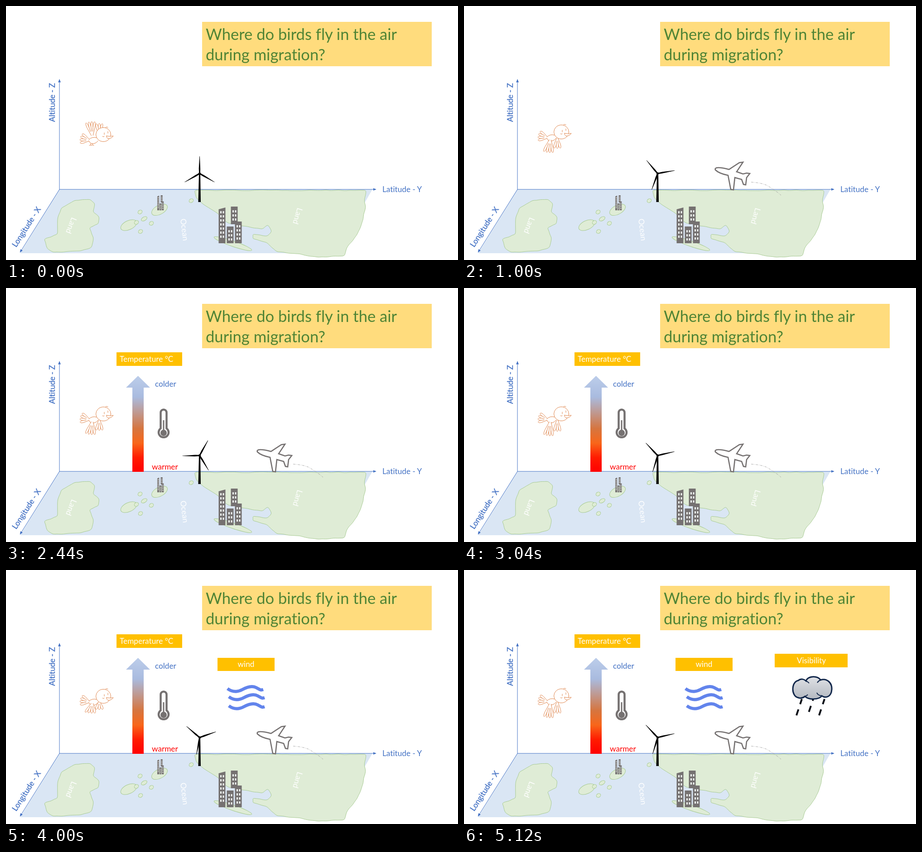
An HTML page for the animation above (5.16 s loop, 998 by 561 pixels).

```html
<!DOCTYPE html>
<html lang="en">
<head>
<meta charset="utf-8">
<title>Bird migration in three dimensions</title>
<style>
html, body { margin: 0; width: 100%; height: 100%; overflow: hidden; background: #fff; }
svg { display: block; width: 100%; height: 100%; }
text { font: 17.2px Lato, Carlito, sans-serif; font-variant-ligatures: none; fill: #4472c4; }
.title { font-size: 34.6px; fill: #4f8435; }
.label, .map { fill: #fff; }
.map, .mid { text-anchor: middle; }
.turned { stroke: #4472c4; stroke-width: .3; }
.axis { fill: none; stroke: #4472c4; marker-end: url(#tip); }
#land > * { fill: #dfecd6; stroke: #a8cb93; }
.pen { fill: #fff; stroke: #e0874f; stroke-linejoin: round; stroke-linecap: round; }
.line { fill: none; }
</style>
</head>
<body>
<svg viewBox="0 0 998 561">
  <defs>
    <linearGradient id="heat" x1="0" y1="0" x2="0" y2="1">
      <stop offset="0" stop-color="#bccdea"/>
      <stop offset=".22" stop-color="#a9bbdf"/>
      <stop offset=".55" stop-color="#d6753f"/>
      <stop offset=".7" stop-color="#f8661a"/>
      <stop offset=".85" stop-color="#ff1c00"/>
      <stop offset="1" stop-color="#f00"/>
    </linearGradient>
    <linearGradient id="grey" x1="0" y1="0" x2="0" y2="1">
      <stop offset="0" stop-color="#dfe1e5"/>
      <stop offset="1" stop-color="#b4b9c1"/>
    </linearGradient>
    <marker id="tip" viewBox="0 0 7 6" markerWidth="7" markerHeight="6" refX="6.5" refY="3" orient="auto">
      <path d="M0,0L7,3L0,6Z" fill="#4472c4"/>
    </marker>
    <g id="city"></g>
  </defs>

  <rect x="433" y="35" width="507" height="98" fill="#ffdc7d"/>
  <text class="title" x="441" y="75">Where do birds fly in the air</text>
  <text class="title" x="441" y="120">during migration?</text>

  <path d="M118,405H809L728,546H31Z" fill="#dae6f4"/>
  <g id="land"></g>
  <text class="map" y="6" transform="translate(144 485) rotate(112)">Land</text>
  <text class="map" y="6" transform="translate(394 494) rotate(83)">Ocean</text>
  <text class="map" y="6" transform="translate(644 464) rotate(107)">Land</text>

  <path class="axis" d="M118,405V162"/>
  <path class="axis" d="M118,405H817"/>
  <path class="axis" d="M118,405L31,544"/>
  <text class="mid turned" y="6" transform="translate(102 213) rotate(-90)">Altitude - Z</text>
  <text class="mid turned" y="6" transform="translate(45 488) rotate(-57)">Longitude - X</text>
  <text x="831" y="411">Latitude - Y</text>

  <use href="#city" transform="translate(469.5 443)"/>
  <use href="#city" transform="translate(334 418) scale(.28 .41)"/>

  <path d="M426,371H429L430,433H424.5Z"/>
  <g id="rotor"></g>

  <g class="pen">
    <path id="farWing"/>
    <g id="body">
      <path id="tail"/>
      <path class="line" d="M200,291Q190,288 183,295M203,298Q198,305 189,304Q184,302 183,298"/>
      <ellipse cx="215" cy="284" rx="16.5" ry="15.5"/>
      <path d="M222,287Q230,289 237,287Q233,293 225,293Q221,290 222,287Z"/>
      <path class="line" d="M217,280v4M225,277v4M220,268q3,-2 5,0M213,288q2,2 4,0"/>
      <path class="line" id="feet" d="M187,304v3l-3,1m3,-1l3,1M191,304v3l3,1"/>
    </g>
    <path id="nearWing"/>
  </g>

  <g class="stage">
    <path fill="#fff" stroke="#757171" stroke-width="2.6" d="M555,362Q553,357 562,357Q571,357 585,361L608,346L616,345L602,366L616,371L624,369L631,370L624,379L622,395L617,394L613,383L598,379L595,406L589,405L583,374Q563,370 555,362Z"/>
    <path class="line" stroke="#a0a0a0" stroke-width=".9" stroke-dasharray="5 2 1 2" d="M634,389Q664,391 675,400Q690,409 700,418"/>
  </g>

  <g class="stage">
    <rect x="244" y="142" width="145" height="30" fill="#ffc000"/>
    <text class="label" x="251" y="163">Temperature °C</text>
    <path d="M291.5,194L318,220H304V406H279V220H265Z" fill="url(#heat)"/>
    <text x="329" y="218">colder</text>
    <text x="322" y="401" style="fill:red">warmer</text>
    <path d="M341.5,310V275a6.5,6.5 0 0 1 13,0V310A11,11 0 1 1 341.5,310Z" fill="#fff" stroke="#757171" stroke-width="4.5"/>
    <path d="M348,292V320" stroke="#757171" stroke-width="3"/>
    <circle cx="348" cy="320" r="7" fill="#757171"/>
  </g>

  <g class="stage">
    <rect x="467" y="194" width="126" height="29" fill="#ffc000"/>
    <text class="label mid" x="530" y="214">wind</text>
    <g class="line" stroke="#6284ec" stroke-width="7">
      <path id="gust" d="M489,262C500,270 511,270 522,264S544,255 553,260S562,266 568,264"/>
      <use href="#gust" x="3" y="18"/>
      <use href="#gust" x="3" y="38"/>
    </g>
  </g>

  <g class="stage">
    <rect x="686" y="185" width="161" height="30" fill="#ffc000"/>
    <text class="label mid" x="767" y="206">Visibility</text>
    <g stroke="#0b0f18" stroke-width="4" stroke-dasharray="12 12 14 99">
      <path d="M746,285l-12,36"/>
      <path d="M771,285l-12,36" stroke-dashoffset="8"/>
      <path d="M796,285l-12,36"/>
    </g>
    <path fill="url(#grey)" stroke="#10264a" stroke-width="3" d="M738,282C722,279 722,247 738,244C744,239 751,241 755,245C760,233 782,233 787,243C801,238 813,249 812,264C811,280 799,284 790,278C784,287 760,287 753,279C748,283 743,284 738,282Z"/>
    <path class="line" stroke="#10264a" stroke-width="2" d="M755,245q5,2 7,5M787,243q-5,2 -7,6M790,278q-9,-1 -11,-7M753,279q4,-1 6,-4"/>
  </g>
</svg>
<script>
const $ = id => document.getElementById(id);
const range = n => [...Array(n).keys()];
const mix = (p, q, t) => p.map((v, k) => v + (q[k] - v) * t);

let seed = 7;
const jitter = () => (seed = seed * 16807 % 2147483647) / 2147483647 * 2 - 1;

// Coastline through a few corners, its edges broken into slightly uneven steps
function coast(corners) {
  const key = corners.split(' ').map(p => p.split(',').map(Number));
  const pts = key.flatMap((p, i) => {
    const q = key[(i + 1) % key.length];
    const n = Math.ceil(Math.hypot(q[0] - p[0], q[1] - p[1]) / 9);
    return range(n).map(k => k ? mix(p, q, k / n).map(v => v + jitter()) : p);
  });
  const curves = pts.map((p, i) => `Q${p} ${mix(p, pts[(i + 1) % pts.length], .5)}`);
  return `<path d="M${mix(pts.at(-1), pts[0], .5)}${curves.join('')}Z"/>`;
}

const islet = (x, y, rx = 5, ry = 4, turn = -30) =>
  `<ellipse rx="${rx}" ry="${ry}" transform="translate(${x} ${y}) rotate(${turn})"/>`;

$('land').innerHTML =
  coast('152,429 186,427 196,436 192,455 206,466 204,481 184,490 193,511 189,533 165,541 104,544 91,536 84,515 114,504 114,468 122,446') +
  coast('416,407 795,407 791,432 794,444 784,485 775,505 753,533 747,552 690,555 640,547 598,543 575,522 545,514 545,504 577,508 587,498 578,483 566,493 515,485 488,478 466,457 437,439 420,424') +
  islet(271, 484, 19, 10, -25) + islet(339, 450, 19, 10, -28) + islet(501, 525, 44, 6, 19) +
  islet(296, 455) + islet(305, 470, 7) + islet(288, 478) + islet(321, 480) + islet(297, 498) + islet(409, 430);

// A tower is 15 wide, with pairs of windows every 9 down
function tower(x, top, base, slope = 0) {
  const rows = Math.floor((base - top - 8) / 9);
  const panes = range(rows * 2).map(k =>
    `M${x + 3.5 + k % 2 * 5.5},${top + 8 + (k >> 1) * 9}h3v5h-3z`);
  return `<path fill="#757171" d="M${x},${top + slope}L${x + 15},${top}V${base}H${x}Z"/>` +
    `<path fill="#eef2f0" d="${panes.join('')}"/>`;
}
$('city').innerHTML = tower(0, 2, 81, 4) + tower(27, 0, 39) + tower(18, 44, 81) + tower(36, 33, 81);

$('rotor').innerHTML = [0, 120, 240].map(a =>
  `<path transform="rotate(${a})" d="M-1.3,0L-1.8,-11L-.3,-38H.4L1.6,-10L1.3,0Z"/>`).join('') + '<circle r="2.6"/>';

// Fan of n feathers around a heading, in degrees; sx and sy foreshorten it
function fan(x, y, heading, spread, len, n, sx = 1, sy = 1) {
  const at = (k, r) => {
    const a = (heading + spread * (k / n - .5)) * Math.PI / 180;
    return [x + Math.cos(a) * len * r * sx, y + Math.sin(a) * len * r * sy];
  };
  const feathers = range(n).map(k => `C${at(k + .1, 1.1)} ${at(k + .9, 1.1)} ${at(k + 1, .68)}`);
  const quills = range(n - 1).map(k => `M${at(k + 1, .68)}L${at(k + 1, .4)}`);
  return `M${at(0, .15)}L${at(0, .68)}${feathers.join('')}L${at(n, .15)}${quills.join('')}`;
}
$('tail').setAttribute('d', fan(186, 297, 193, 70, 23, 4));

const STEP = 40, LOOP = 5160, SLIDE = 26, FLAP = 16;
const stages = [...document.querySelectorAll('.stage')];
const show = (el, on) => el.style.display = on ? '' : 'none';

function draw(now) {
  const tick = Math.floor(now % LOOP / STEP);
  // Every new slide opens on a held pose
  const i = tick && tick % SLIDE === 0 ? SLIDE - 1 : tick % SLIDE;
  const slide = Math.floor((tick + 1) / SLIDE);
  const beat = Math.cos(i / FLAP * 2 * Math.PI);
  const wide = 1.3 - .3 * Math.abs(beat);

  stages.forEach((el, k) => show(el, k < slide));
  show($('feet'), beat > 0);
  $('body').setAttribute('transform', `translate(0 ${3 * beat - 3})`);
  $('nearWing').setAttribute('d', fan(191, 291, -98, 42, 36, 4, wide, beat));
  $('farWing').setAttribute('d', fan(206, 288, -90, 40, 29, 3, wide, beat));
  $('rotor').setAttribute('transform', `translate(427.5 370) rotate(${i * 3.2})`);
}

const start = performance.now();
(function loop() {
  draw(performance.now() - start);
  requestAnimationFrame(loop);
})();
</script>
</body>
</html>
```
